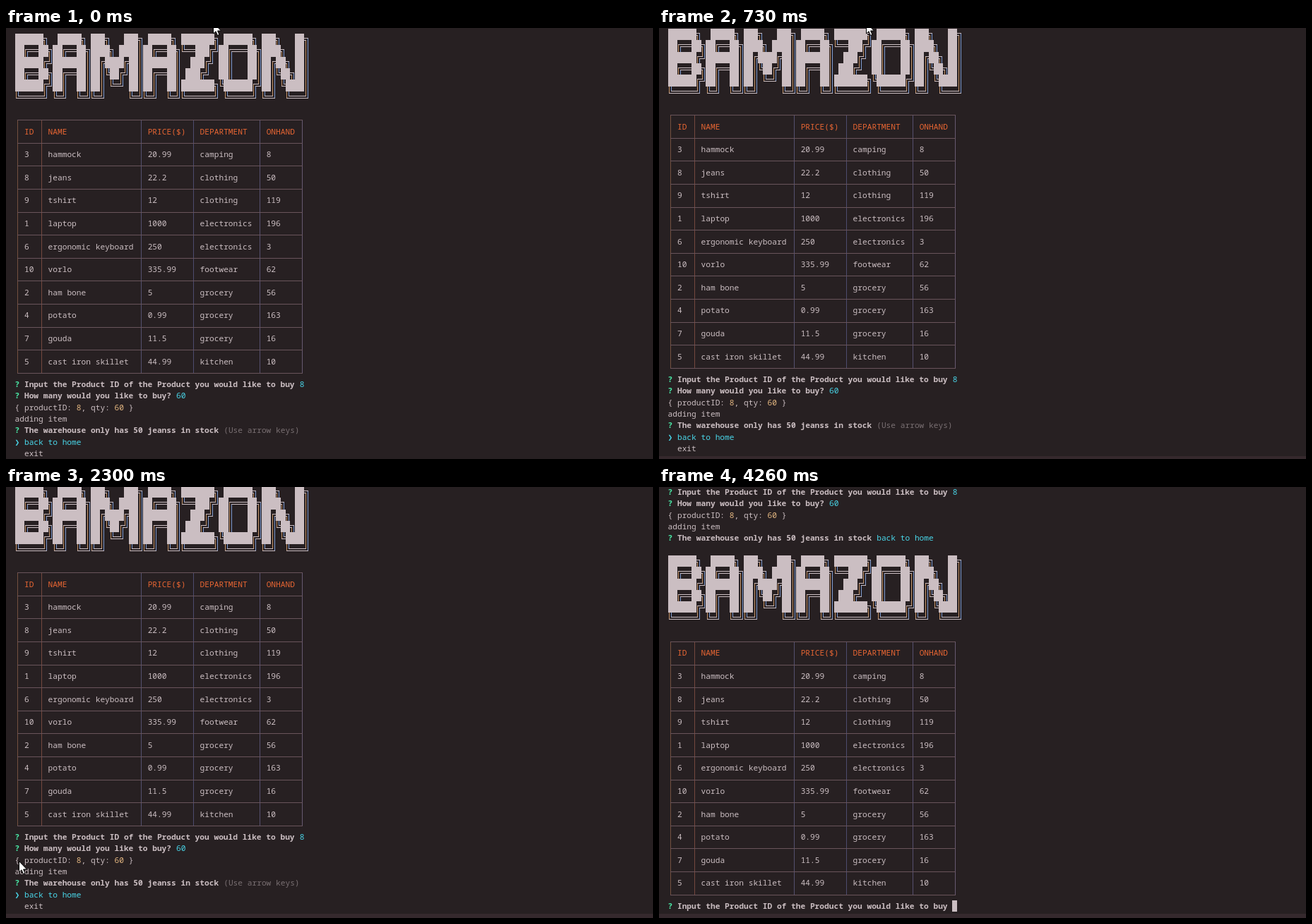
An HTML page with a canvas for the animation above (8 s loop, 916 by 611 pixels).

```html
<!DOCTYPE html>
<html lang="en">
<head>
<meta charset="utf-8">
<title>Terminal shop</title>
<style>
  html, body { margin: 0; width: 100%; height: 100%; overflow: hidden; background: #272022; }
  canvas { display: block; }
</style>
</head>
<body>
<canvas id="stage" width="916" height="611"></canvas>
<script>
const ctx = document.getElementById('stage').getContext('2d');
const LOOP = 8000, CELL = 6.72, LINE = 16.3, LEFT = 12.5;
const FG = '#cbbec2', BG = '#272022', RED = '#e66533', GREEN = '#49e9a6',
      CYAN = '#49d6e9', YELLOW = '#e4b781', DIM = '#796f72', BAR = '#35292d';
const FONT = '11.2px "Noto Sans Mono", "DejaVu Sans Mono", monospace';

const BANNER = [
  '██████╗  █████╗ ███╗   ███╗ █████╗ ███████╗ ██████╗ ███╗   ██╗',
  '██╔══██╗██╔══██╗████╗ ████║██╔══██╗╚══███╔╝██╔═══██╗████╗  ██║',
  '██████╔╝███████║██╔████╔██║███████║  ███╔╝ ██║   ██║██╔██╗ ██║',
  '██╔══██╗██╔══██║██║╚██╔╝██║██╔══██║ ███╔╝  ██║   ██║██║╚██╗██║',
  '██████╔╝██║  ██║██║ ╚═╝ ██║██║  ██║███████╗╚██████╔╝██║ ╚████║',
  '╚═════╝ ╚═╝  ╚═╝╚═╝     ╚═╝╚═╝  ╚═╝╚══════╝ ╚═════╝ ╚═╝  ╚═══╝'
];
const ROWS = `ID|NAME|PRICE($)|DEPARTMENT|ONHAND
3|hammock|20.99|camping|8
8|jeans|22.2|clothing|50
9|tshirt|12|clothing|119
1|laptop|1000|electronics|196
6|ergonomic keyboard|250|electronics|3
10|vorlo|335.99|footwear|62
2|ham bone|5|grocery|56
4|potato|0.99|grocery|163
7|gouda|11.5|grocery|16
5|cast iron skillet|44.99|kitchen|10`.split('\n').map(r => r.split('|'));
const RULES = [0, 5, 26, 37, 51, 60];
const RULE_COLORS = ['#74503f', '#74483f', '#55506f', '#4d4c6e', '#55506f', '#665a70'];

// [start ms, vertical offset]
const SCROLL = [[0, 0], [150, -3], [580, -6], [730, -7], [1510, -8], [1660, -9],
  [4140, -9 - 7 * LINE], [4260, -9 - 30 * LINE]];
// [start ms, tip x, tip y]
const POINTER = [[0, 293, -8], [1940, 252, 110], [2060, 160, 310], [2180, 70, 460],
  [2300, 18, 530], [2420, 82, 548], [2570, 90, 553], [2690, 103, 563],
  [2810, 117, 575], [2930, 128, 583], [3050, 0, -50]];

let offset = 0;
const at = (keys, t) => keys.filter(k => k[0] <= t).pop();
const colX = c => LEFT + c * CELL;
const midY = l => Math.round(16.1 + l * LINE + offset);

function rect(x, y, w, h, color) {
  ctx.fillStyle = color;
  ctx.fillRect(x, y, w, h);
}

function put(line, col, text, color = FG, bold = false) {
  ctx.font = (bold ? 'bold ' : '') + FONT;
  ctx.fillStyle = color;
  ctx.fillText(text, colX(col), midY(line) + 4);
}

function glyph(ch, line, col) {
  const x = Math.round(colX(col)), X = Math.round(colX(col + 1));
  const y = midY(line) - 8, Y = midY(line + 1) - 8;
  if (ch === '█') return rect(x, y, X - x, Y - y, FG);
  const cx = Math.round(colX(col + 0.5)), cy = midY(line);
  const l = cx - 2, r = cx + 1, t = cy - 2, b = cy + 1;
  const across = (py, a, z) => rect(Math.min(a, z), py, Math.abs(z - a) + (z < a ? 1 : 0), 1, FG);
  const down = (px, a, z) =>
    rect(px, Math.min(a, z), 1, Math.abs(z - a) + (z < a ? 1 : 0), px === l ? '#c49468' : '#7d9bd0');
  if (ch === '═') { across(t, x, X); across(b, x, X); return; }
  if (ch === '║') { down(l, y, Y); down(r, y, Y); return; }
  const right = '╔╚'.includes(ch), below = '╔╗'.includes(ch);
  const [ox, ix, ex] = right ? [l, r, X] : [r, l, x];
  const [oy, iy, ey] = below ? [t, b, Y] : [b, t, y];
  down(ox, oy, ey);
  down(ix, iy, ey);
  across(oy, ox, ex);
  across(iy, ix, ex);
}

function banner(line) {
  BANNER.forEach((row, i) => [...row].forEach((ch, c) => {
    if (ch !== ' ') glyph(ch, line + i, c);
  }));
}

function table(line) {
  const xs = RULES.map(c => Math.floor(colX(c + 0.5) + 0.6));
  const top = midY(line), bottom = midY(line + 2 * ROWS.length);
  xs.forEach((x, i) => rect(x, top, 1, bottom - top + 1, RULE_COLORS[i]));
  for (let i = 0; i <= ROWS.length; i++)
    rect(xs[0], midY(line + 2 * i), xs[5] - xs[0] + 1, 1, '#69545b');
  ROWS.forEach((row, i) => row.forEach((text, c) =>
    put(line + 1 + 2 * i, RULES[c] + 2, text, i ? FG : RED)));
}

function ask(line, text, answer = '', color = CYAN) {
  put(line, 0, '?', GREEN, true);
  put(line, 2, text, FG, true);
  put(line, text.length + 3, answer, color);
}

function caret(line, col) {
  rect(Math.round(colX(col) - 0.4), midY(line) - 8, 7, 16, FG);
}

function pointer(x, y) {
  ctx.save();
  ctx.translate(x, y);
  ctx.beginPath();
  [[0.5, 0.5], [0.5, 16], [4, 12.8], [6.5, 18.5], [9, 17.5], [6.6, 12], [11.5, 12]]
    .forEach(p => ctx.lineTo(...p));
  ctx.closePath();
  ctx.fillStyle = '#fff';
  ctx.strokeStyle = '#000';
  ctx.lineWidth = 1;
  ctx.fill();
  ctx.stroke();
  ctx.restore();
}

function draw(t) {
  const buy = 'Input the Product ID of the Product you would like to buy';
  offset = at(SCROLL, t)[1];
  rect(0, 0, 916, 611, BG);

  banner(0);
  table(7);
  ask(30, buy, '8');
  ask(31, 'How many would you like to buy?', '60');
  put(32, 0, '{ productID:');
  put(32, 13, '8', YELLOW);
  put(32, 14, ', qty:');
  put(32, 21, '60', YELLOW);
  put(32, 24, '}');
  put(33, 0, 'adding item');

  const stock = 'The warehouse only has 50 jeanss in stock';
  if (t < 4140) {
    ask(34, stock, '(Use arrow keys)', DIM);
    put(35, 0, '❯', CYAN);
    put(35, 2, 'back to home', CYAN);
    put(36, 2, 'exit');
  } else {
    ask(34, stock, 'back to home');
    banner(36);
    if (t < 4260) {
      caret(43, 0);
    } else {
      table(43);
      ask(66, buy);
      caret(66, 60);
    }
  }

  const edge = 614 + Math.max(offset, -9);
  rect(0, edge, 916, 611, BAR);
  const [, x, y] = at(POINTER, t);
  pointer(x, y);
}

const start = performance.now();
function tick() {
  draw((performance.now() - start) % LOOP);
  requestAnimationFrame(tick);
}
tick();
</script>
</body>
</html>
```
